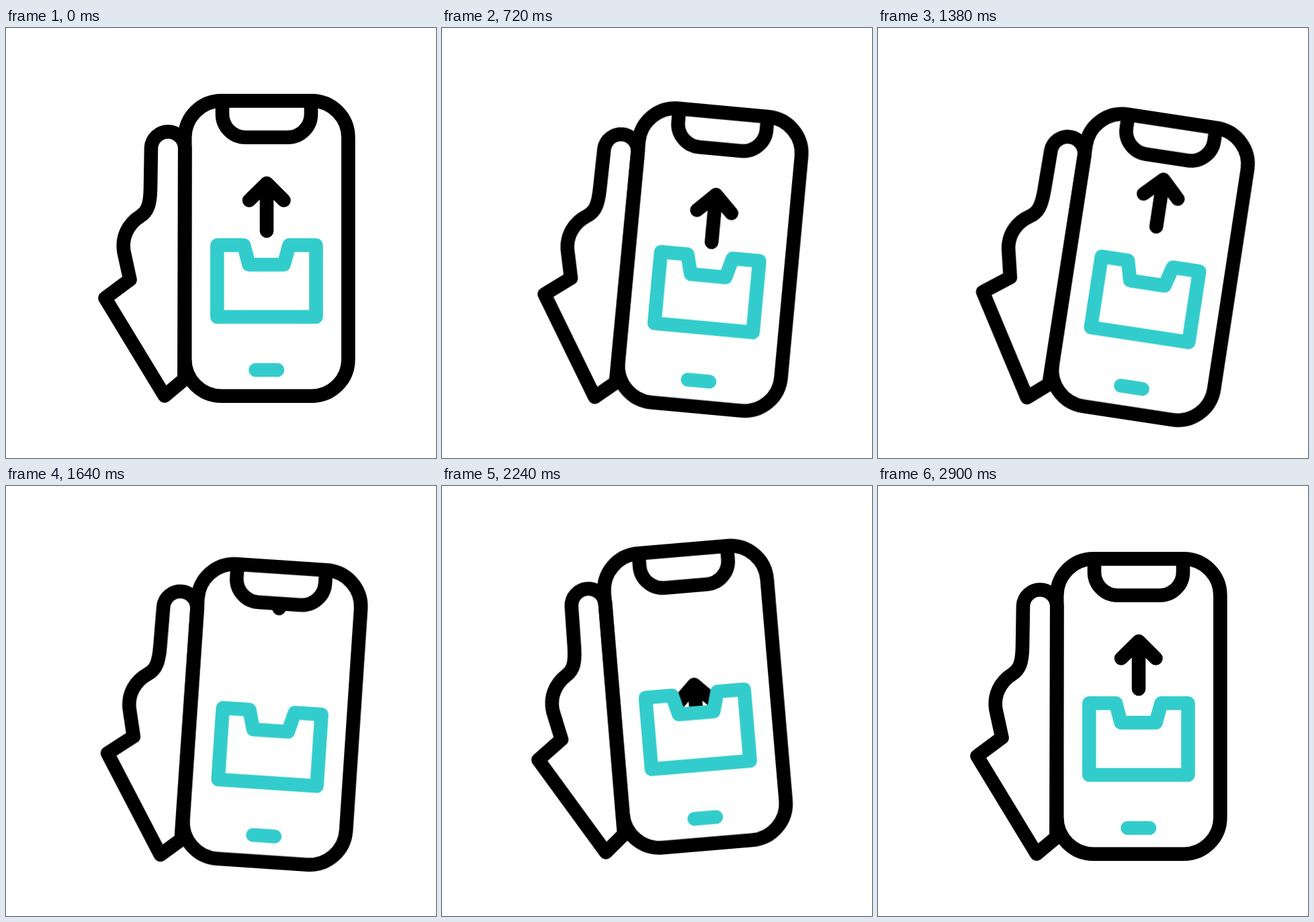
An HTML page for the animation above (3120 ms loop, 640 px wide and 640 px high).

```html
<!DOCTYPE html>
<html lang="en">
<head>
<meta charset="utf-8">
<title>Phone upload</title>
<style>
  html, body { margin: 0; width: 100%; height: 100%; overflow: hidden; background: #fff; }
  svg { display: block; width: 100vw; height: 100vh; }
  #device {
    fill: none; stroke: #000; stroke-width: 20.6;
    stroke-linecap: round; stroke-linejoin: round;
    transform-origin: 212.5px 454px;
  }
  .accent { stroke: #33cccc; }
</style>
</head>
<body>
<svg viewBox="0 0 640 640">
  <!-- The arrow shows only between the notch and the tray. -->
  <clipPath id="screen">
    <path d="M266 163H510V323H421.5L413.5 352H361.5L354 323H266Z"/>
  </clipPath>
  <g id="device">
    <path id="hand" d="M265.3 523L266.3 178A25.2 25.2 0 0 0 216 178L215 240C214.5 262 211 273 200 280C181 292 172 312 175.5 333L184.5 374.5L147.5 402L236 547.5Z"/>
    <g clip-path="url(#screen)">
      <path id="arrow" d="M388 302V231M362 256.5L388 231L413.5 256.5"/>
    </g>
    <rect id="phone" x="266.2" y="108.4" width="243.2" height="439.3" rx="54.5"/>
    <path id="notch" stroke-linecap="butt" d="M322 108V128A34.5 34.5 0 0 0 356.5 162.7H419.5A34.5 34.5 0 0 0 454 128V108"/>
    <path id="tray" class="accent" d="M314.3 323.3H354L361.5 352.2H413.5L421.5 323.3H461.5V430H314.3Z"/>
    <path id="button" class="accent" d="M371.5 509H404"/>
  </g>
</svg>
<script>
  const LOOP = 3120;
  const SMOOTH = 'cubic-bezier(0.3333, 0, 0.6667, 1)';

  // Rocks to 10 degrees, then swings back half as far each time.
  const START = 210, END = 2900;
  const swings = [1195, 2205, 2620].map((at, i) => ({ at, value: 10 * (-0.5) ** i }));
  const tilt = [{ at: START, value: 0 }, ...swings, { at: END, value: 0 }];

  // Leaves under the notch, rises again out of the tray and settles.
  const ABOVE = -160, BELOW = 150, OVERSHOOT = -10;
  const lift = [
    { at: 1200, value: 0 }, { at: 1800, value: ABOVE },
    { at: 1800, value: BELOW }, { at: 2000, value: BELOW },
    { at: 2520, value: OVERSHOOT }, { at: 2700, value: 0 }
  ];

  function play(id, steps, toTransform) {
    const rest = at => ({ at, value: 0 });
    const frames = [rest(0), ...steps, rest(LOOP)].map(({ at, value }) => ({
      offset: at / LOOP, transform: toTransform(value), easing: SMOOTH
    }));
    document.getElementById(id).animate(frames, { duration: LOOP, iterations: Infinity });
  }

  play('device', tilt, v => `rotate(${v}deg)`);
  play('arrow', lift, v => `translateY(${v}px)`);
</script>
</body>
</html>
```
